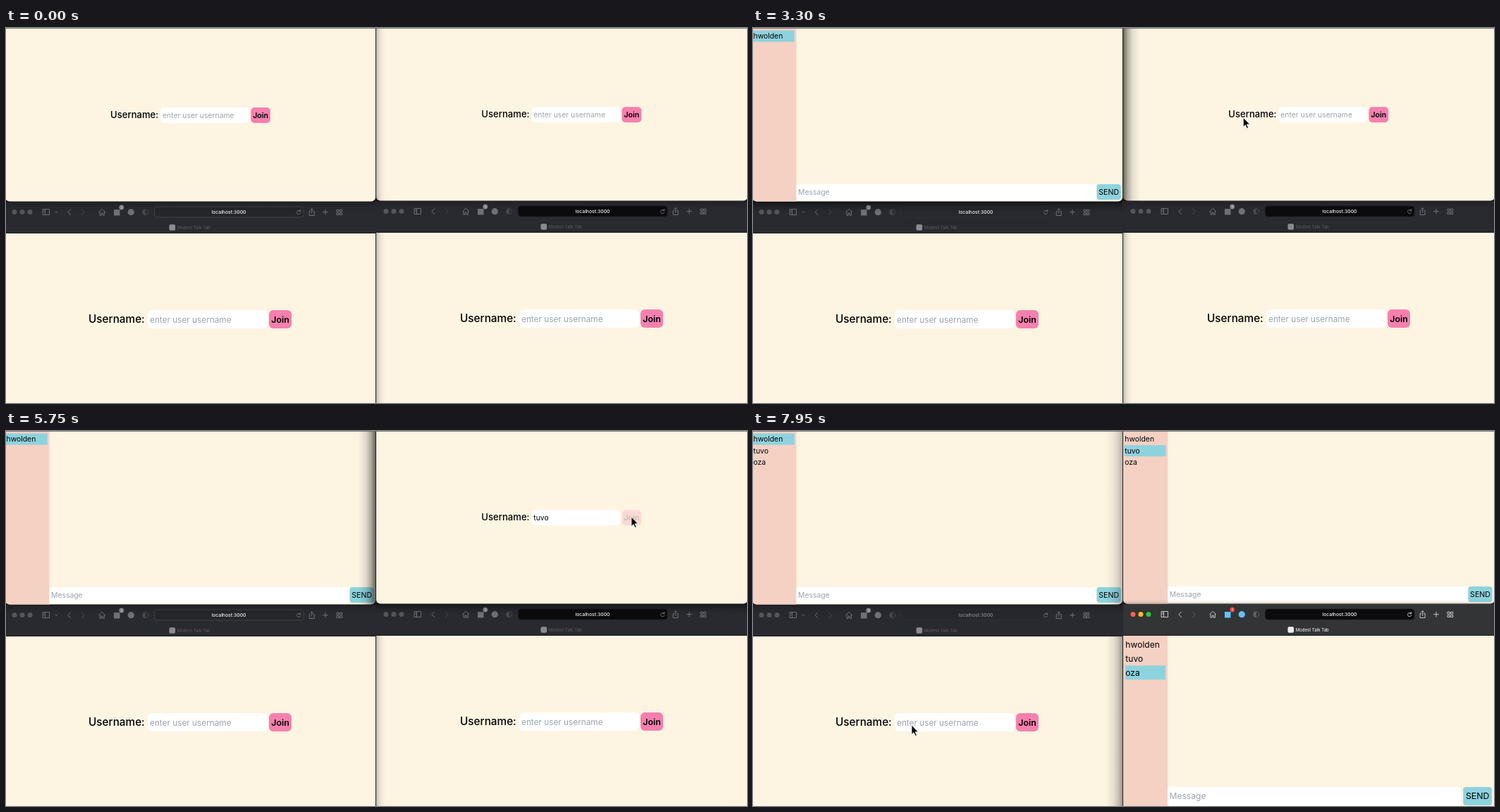
Write an HTML page that moves like this. It is 1051x533 px and loops after 8 s.

```html
<!DOCTYPE html>
<html lang="en">
<head>
<meta charset="utf-8">
<title>Chat windows</title>
<style>
  html, body { margin: 0; width: 100%; height: 100%; overflow: hidden; background: #12151b; }
  svg { display: block; width: 1051px; height: 533px; font-family: Inter, "Open Sans", sans-serif; }
  text { white-space: pre; }
  .paper { fill: #fdf4e2; }
  .side { fill: #f4d1c3; }
  .chip, .send { fill: #8dd3de; }
  .field { fill: #fff; }
  .join { fill: #f580ae; }
  .hint { fill: #9ca3af; }
  .ring { fill: none; stroke: #1f62b0; stroke-width: 1.5; }
  .label { font-weight: 500; }
  .strong { font-weight: 600; }
  .bar { --ink: #707176; --dim: #484a4e; --l1: #56575b; --l2: #56575b; --l3: #56575b;
         --ext: #707176; --badge: #8b8c90; --title: #5b5c61; --icon: #8a8b8e; --bg: #292a2f; }
  .bar.on { --ink: #c4c4c6; --dim: #606164; --l1: #ff5f57; --l2: #febc2e; --l3: #28c840;
            --ext: #5fc3f5; --badge: #f0433c; --title: #fff; --icon: #ececee; --bg: #333436; }
  .line { fill: none; stroke: var(--ink); stroke-width: 1; stroke-linecap: round; stroke-linejoin: round; }
  .line.dim { stroke: var(--dim); }
  .url { fill: #f4f4f5; font-weight: 500; font-size: 6.8px; text-anchor: middle; }
  .title { fill: var(--title); font-size: 6.05px; }
</style>
</head>
<body>
<svg id="stage" viewBox="0 0 1051 533"></svg>
<script>
const LOOP = 8000;
const USERS = ['hwolden', 'tuvo', 'oza'];
const TITLE = 'Modest Talk Tab';

const rect = (x, y, w, h, cls, r = 0, extra = '') =>
  `<rect x="${x}" y="${y}" width="${w}" height="${h}" rx="${r}" class="${cls}" ${extra}/>`;
const text = (x, y, size, str, cls = '', extra = '') =>
  `<text x="${x}" y="${y}" font-size="${size}" class="${cls}" ${extra}>${str}</text>`;
const group = (id, body, extra = '') => `<g id="${id}" ${extra}>${body}</g>`;

// Login form: x is the left edge of the label, cy the middle of the field.
function form(id, x, cy, big) {
  const m = big
    ? { field: 84, w: 170, join: 256, jw: 32, h: 26, r: 6, label: 15.3, size: 11.8, js: 12.4 }
    : { field: 71, w: 126, join: 199.3, jw: 27.6, h: 22, r: 5, label: 13.1, size: 10.38, js: 10.6 };
  const base = cy + m.label * 0.305, top = cy - m.h / 2, fx = x + m.field;
  return group(id + '-form',
    text(x, base, m.label, 'Username:', 'label') +
    rect(fx, top, m.w, m.h, 'field', m.r) +
    rect(fx, top, m.w, m.h, 'ring', m.r, `id="${id}-ring"`) +
    text(fx + 3, base, m.size, 'enter user username', 'hint', `id="${id}-hint"`) +
    text(fx + 3, base, m.size, '', '', `id="${id}-typed"`) +
    rect(fx + 2.7, base - m.size, 0.9, m.size * 1.25, '', 0, `id="${id}-caret"`) +
    group(id + '-join',
      rect(x + m.join, top, m.jw, m.h, 'join', m.r) +
      text(x + m.join + m.jw / 2, base, m.js, 'Join', 'strong', 'text-anchor="middle"')));
}

// Chat room: o holds the box, the row metrics and the message bar.
function chat(id, own, o) {
  const rows = USERS.map((name, i) => {
    const cy = o.row + i * o.pitch;
    return group(`${id}-user${i}`,
      (i === own ? rect(o.x, cy - o.chip / 2, o.chipW, o.chip, 'chip') : '') +
      text(o.x + o.pad, cy + o.size * 0.36, o.size, name));
  }).join('');
  const mid = o.msg + o.mh / 2;
  return group(id + '-chat',
    rect(o.left, o.top, o.sideW, 300, 'side') + rows +
    rect(o.left + o.sideW, o.msg, o.msgW, o.mh + 1, 'field', 2) +
    text(o.left + o.sideW + 2.5, mid + o.size * 0.36, o.size, 'Message', 'hint') +
    rect(o.send, o.msg, o.sendW, o.mh, 'send', 4) +
    text(o.send + o.sendW / 2, mid + o.size * 0.37, o.size * 1.02, 'SEND', '', 'text-anchor="middle"'));
}

const small = (dx, dy) => ({ left: dx - 1.5, top: 0, sideW: 63, x: dx, pad: 0.5, row: 11.6, pitch: 16.5,
  chip: 16, chipW: 58.7, size: 10.4, msg: 222 + dy, mh: 22, msgW: 425, send: dx + 487.6, sendW: 34.2 });
const large = { left: 525, top: 291, sideW: 63, x: 528, pad: 0.3, row: 304, pitch: 19.7,
  chip: 20, chipW: 57, size: 12.1, msg: 506, mh: 26, msgW: 416, send: 1007.3, sendW: 40.7 };

const icon = (d, cls = '') => `<path class="line ${cls}" d="${d}"/>`;

// Browser toolbar; a shifts the window controls, b everything else.
function bar(id, x, w, a, b, tab, dy, chevron) {
  const light = (cx, n) => `<circle cx="${cx}" cy="261.5" r="3.5" fill="var(--l${n})"/>`;
  return `<g id="${id}-bar" class="bar" transform="translate(0 ${dy})">` +
    rect(x, 247, w, 45, '', 0, 'fill="var(--bg)"') +
    rect(x, 291.3, w, 0.7, '', 0, 'fill="#17181b"') +
    `<g transform="translate(${a})">` + light(12, 1) + light(23, 2) + light(34, 3) +
    icon('M52.5 257.5h9v8h-9zM55.5 257.5v8M53.6 259.5h.6M53.6 261.5h.6') +
    (chevron ? icon('M70 261l1.6 1.6 1.6-1.6') : '') + '</g>' +
    `<g transform="translate(${b})">` +
    icon('M91.5 258l-3.6 3.8 3.6 3.8') + icon('M107.5 258l3.6 3.8-3.6 3.8', 'dim') +
    icon('M131.8 261.5l4.4-4.2 4.4 4.2M133 261v5.2h2.2v-3h2v3h2.2v-5.2') +
    rect(153, 258, 8.5, 8.5, '', 0, 'fill="var(--ext)"') +
    '<circle cx="163.8" cy="255" r="3.4" fill="var(--badge)"/>' +
    text(163.8, 256.8, 5, '1', '', 'fill="#fff" text-anchor="middle"') +
    '<circle cx="177.3" cy="261.7" r="4.6" fill="var(--ext)"/>' +
    '<circle cx="197.7" cy="261.7" r="4" class="line dim"/>' +
    '<path d="M197.7 257.7a4 4 0 0 0 0 8z" fill="var(--dim)"/>' +
    rect(210.5, 254, 211.5, 15, '', 4, `id="${id}-box" fill="${chevron ? '#25262a' : '#0b0b0d'}" stroke="${chevron ? '#46474b' : '#1b1b1d'}" stroke-width=".8"`) +
    text(316, 264, 6.8, 'localhost:3000', 'url', `id="${id}-url"`) +
    icon('M417.4 260.3a2.7 2.7 0 1 0 .5 2.4M417.8 258.4v2.2h-2.2') +
    icon('M431.6 260.5h-1.4v6h7v-6h-1.4M433.7 263.5v-6.7M431.9 258.4l1.8-1.8 1.8 1.8') +
    icon('M453 258.2v7M449.5 261.7h7') +
    icon('M469.4 258.2h2.8v2.8h-2.8zM474 258.2h2.8v2.8h-2.8zM469.4 262.8h2.8v2.8h-2.8zM474 262.8h2.8v2.8h-2.8z') +
    '</g>' +
    rect(tab, 279.2, 8.6, 8.6, '', 1.8, 'fill="var(--icon)"') +
    text(tab + 11.2, 285.7, 6.05, TITLE, 'title') + '</g>';
}

// Soft edge shadow, fading along the axis given by the gradient.
const fade = (id, x1, y1, x2, y2) =>
  `<linearGradient id="${id}" x1="${x1}" y1="${y1}" x2="${x2}" y2="${y2}">` +
  [[0, .62], [.25, .34], [.55, .13], [1, 0]].map(([p, a]) => `<stop offset="${p}" stop-opacity="${a}"/>`).join('') +
  '</linearGradient>';
const shade = (id, x, y, w, h, dir) => rect(x, y, w, h, '', 0, `id="${id}" fill="url(#${dir})"`);
const clip = (id, x, w, b) => `<clipPath id="${id}"><rect x="${x}" y="-10" width="${w}" height="${b + 10}" rx="6"/></clipPath>`;

document.getElementById('stage').innerHTML =
  '<defs>' + fade('toRight', 0, 0, 1, 0) + fade('toLeft', 1, 0, 0, 0) + fade('down', 0, 0, 0, 1) + fade('up', 0, 1, 0, 0) +
  clip('clipL', -1, 525, 246.5) + clip('clipR', 525, 527, 245.5) + '</defs>' +
  rect(0, 0, 1051, 533, '', 0, 'fill="#12151b"') +
  bar('bl', 0, 524, 0, 0, 231.5, 0, true) + rect(0, 292, 524, 241, 'paper') + form('bl', 117, 414, true) +
  bar('br', 525, 526, 527, 516, 758.5, -1, false) + rect(525, 291, 526, 242, 'paper') +
  form('br', 644, 413, true) + chat('br', 2, large) +
  shade('downL', 0, 246, 524, 17, 'down') + shade('downR', 525, 245, 526, 17, 'down') +
  `<g clip-path="url(#clipL)">` + rect(-1, 0, 525, 247, 'paper') + form('tl', 148, 124, false) +
  chat('tl', 0, small(0, 0)) + '</g>' +
  `<g clip-path="url(#clipR)">` + rect(525, 0, 527, 246, 'paper') + form('tr', 674.3, 123.2, false) +
  chat('tr', 1, small(526.8, -1)) + '</g>' +
  shade('baseTop', 525, 0, 13, 246, 'toRight') + shade('baseLow', 525, 291, 13, 242, 'toRight') +
  shade('castTL', 525, 0, 24, 246, 'toRight') + shade('castTR', 500, 0, 24, 247, 'toLeft') +
  shade('castBR', 500, 292, 24, 241, 'toLeft') + shade('liftBR', 525, 239, 526, 6.5, 'up') +
  rect(524, 0, 1.1, 533, '', 0, 'fill="#26282c"') + rect(0, 0, 1051, 0.8, '', 0, 'fill="#63666c"') +
  group('arrow', '<path d="M0 0V13.4L3 10.6L5.2 15.4L7.2 14.5L5.1 9.8H9.3Z" stroke="#fff" stroke-width=".8" stroke-linejoin="round"/>') +
  group('beam', '<path id="bar" d="M-3-7Q0-7 0-5Q0-7 3-7M0-5.5V5.5M-3 7Q0 7 0 5Q0 7 3 7M-1.5 2.5h3" fill="none" stroke="#111" stroke-width="1.2"/>');

const el = {};
document.querySelectorAll('[id]').forEach(e => el[e.id] = e);
const show = (id, on) => { el[id].style.display = on ? '' : 'none'; };
const alpha = (id, a) => { el[id].style.opacity = a; };
const ramp = (t, a, b) => Math.min(1, Math.max(0, (t - a) / (b - a)));
const within = (t, spans) => spans.some(([a, b]) => t >= a && t < b);

// Each session: when the field gets focus, its key strokes, and the press on Join.
const sessions = {
  tl: { focus: 1300, keys: [2050, 2200, 2250, 2300, 2400, 2450, 2550], press: 3000, name: USERS[0], rest: [1500, 2050] },
  tr: { focus: 3650, keys: [4700, 4800, 4950, 5050], press: 5700, name: USERS[1] },
  br: { focus: 6320, keys: [6650, 6800, 6950], press: 7500, name: USERS[2] },
  bl: { focus: LOOP, keys: [], press: LOOP, name: '' }
};
const joined = ['tl', 'tr', 'br'].map(id => sessions[id].press + 130);

const path = [
  [50, 10, 381], [550, 10, 381], [1150, 271, 126], [2700, 271, 126], [2800, 332, 106], [2950, 360, 122],
  [3150, 360, 122], [3400, 873, 130], [3600, 837, 128], [5300, 837, 128], [5600, 887, 122], [5840, 887, 122],
  [6100, 761, 415], [6650, 761, 415], [7100, 800.5, 416], [7250, 800.5, 416], [7450, 915, 413],
  [7620, 915, 413], [7950, 225, 418], [8000, 225, 418]
];
const hidden = [[0, 50], [2050, 2700], [4700, 5300], [6650, 7100]];
const beams = [[3600, 5400], [6120, 7300]];

function pointer(t) {
  const i = Math.max(1, path.findIndex(p => p[0] > t));
  const [a, x, y] = path[i - 1], [b, u, v] = path[i];
  const p = ramp(t, a, b), s = p * p * (3 - 2 * p);
  return `translate(${x + (u - x) * s} ${y + (v - y) * s})`;
}

function render(t) {
  for (const id in sessions) {
    const s = sessions[id], n = s.keys.filter(k => t >= k).length;
    const active = t >= s.focus && t < s.press, inChat = t >= s.press + 130;
    show(id + '-form', !inChat);
    show(id + '-hint', !n);
    el[id + '-typed'].textContent = s.name.slice(0, n);
    show(id + '-caret', active && !(s.rest && within(t, [s.rest])));
    if (active) el[id + '-caret'].setAttribute('transform', `translate(${n ? el[id + '-typed'].getComputedTextLength() + .5 : 0})`);
    alpha(id + '-ring', active ? ramp(t, s.focus, s.focus + 80) : 0);
    alpha(id + '-join', 1 - 0.78 * ramp(t, s.press, s.press + 50));
    if (el[id + '-chat']) {
      show(id + '-chat', inChat);
      joined.forEach((j, i) => show(`${id}-user${i}`, t >= j));
    }
  }

  const tl = ramp(t, 1250, 1400) - ramp(t, 3550, 3750);
  const tr = ramp(t, 3550, 3750) - ramp(t, 6180, 6380) * 0.55;
  const br = ramp(t, 6170, 6380);
  alpha('castTL', tl * 0.75);
  alpha('castTR', tr > 0 ? tr * 0.95 : 0);
  alpha('castBR', br * 0.6);
  alpha('liftBR', br * 0.25);
  alpha('baseTop', 0.4 * (1 - ramp(t, 3550, 3750)));
  alpha('baseLow', 0.4 * (1 - br));
  alpha('downL', 0.45 + 0.55 * tl);
  alpha('downR', (0.35 + 0.5 * Math.max(0, tr)) * (1 - br));
  el['br-bar'].classList.toggle('on', t >= 6300);
  alpha('bl-box', 1 - 0.7 * Math.max(tl, br));
  el['bl-url'].style.fill = t >= 6300 ? '#8b8c90' : '';

  const gone = within(t, hidden), beam = within(t, beams), at = pointer(t);
  show('arrow', !gone && !beam);
  show('beam', !gone && beam);
  el.arrow.setAttribute('transform', at);
  el.beam.setAttribute('transform', at);
}

const start = performance.now();
function tick() {
  render((performance.now() - start) % LOOP);
  requestAnimationFrame(tick);
}
tick();
</script>
</body>
</html>
```
